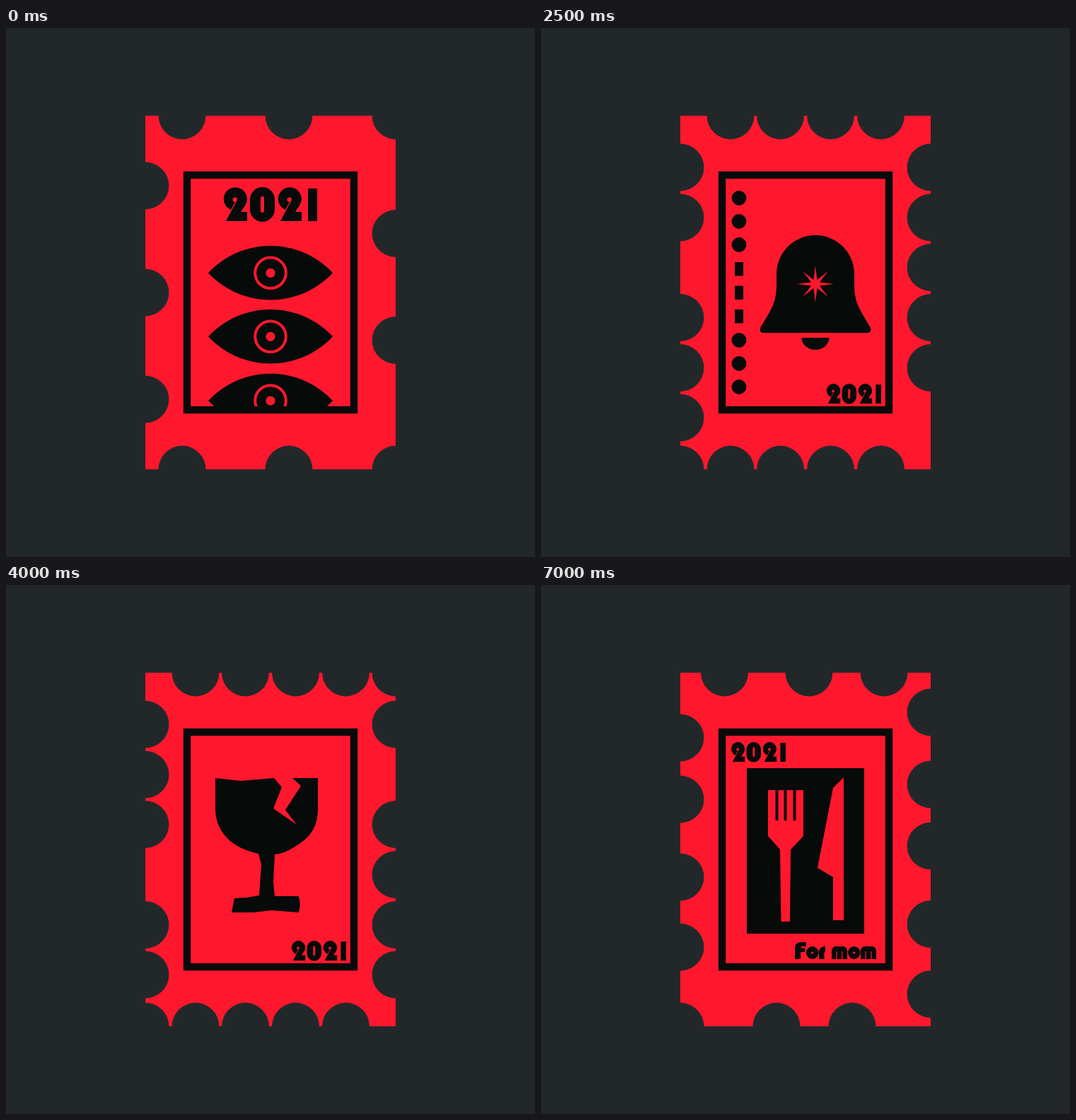
These frames come from a looping animation (748 by 748 pixels, 7.5 s). An HTML page:

```html
<!DOCTYPE html>
<html lang="en">
<head>
<meta charset="utf-8">
<title>Stamps</title>
<style>
html, body { margin: 0; height: 100%; overflow: hidden; background: #222829; }
svg { display: block; width: 100vw; height: 100vh; }
</style>
</head>
<body>
<svg id="stage" viewBox="0 0 748 748" role="img"></svg>
<script>
const RED = '#ff182d', INK = '#060a09', BACK = '#222829';
const stage = document.getElementById('stage');

const path = (d, fill = INK) => `<path d="${d}" fill="${fill}" fill-rule="evenodd"/>`;
const line = (d, width) => `<path d="${d}" fill="none" stroke="${INK}" stroke-width="${width}"/>`;
const disc = (x, y, r, fill = INK) => `<circle cx="${x}" cy="${y}" r="${r}" fill="${fill}"/>`;
const box = (x, y, w, h, fill = INK) => `<rect x="${x}" y="${y}" width="${w}" height="${h}" fill="${fill}"/>`;
const move = (x, y, body, more = '') => `<g transform="translate(${x} ${y}) ${more}">${body}</g>`;

// Display lettering: [advance, outline] on a 48 unit body
const glyphs = {
  2: [39, 'M3 48H33V35H24L30 26A16.5 16.5 0 1 0 10 32L16 21A3.3 3.3 0 1 1 19 18Z'],
  0: [38, 'M-2 17.5a17.5 17.5 0 0 1 35 0v14a17.5 17.5 0 0 1-35 0ZM13 15.5v18a2.5 2.5 0 0 0 5 0v-18a2.5 2.5 0 0 0-5 0Z'],
  1: [19, 'M3 2H16V48H3Z'],
  F: [32, 'M0 48V16A16 16 0 0 1 16 0H32V12H18V17H29V28H16V48Z'],
  o: [36, 'M0 30a17.5 18 0 0 1 35 0a17.5 18 0 0 1-35 0ZM14 30a3.5 3.5 0 0 0 7 0a3.5 3.5 0 0 0-7 0Z'],
  r: [18, 'M0 48V28A16 16 0 0 1 16 12H18V27Q15 27 15 33V48Z'],
  m: [46, 'M0 48V24A12 12 0 0 1 12 12H32A12 12 0 0 1 44 24V48H31V26H28.5V48H15.5V26H13V48Z'],
  ' ': [18, '']
};
function word(text, x, y, scale) {
  let pen = 0;
  return move(x, y, [...text].map(c => {
    const [advance, d] = glyphs[c];
    pen += advance;
    return move(pen - advance, 0, path(d));
  }).join(''), `scale(${scale})`);
}
// Each place: centre x, centre y, angle
const loose = (text, places) => [...text].map((c, i) => {
  const [x, y, turn] = places[i], mid = c === '1' ? 9.5 : 16;
  return move(x, y, path(glyphs[c][1]), `rotate(${turn}) scale(1.18) translate(${-mid} -24.5)`);
}).join('');

const frame = `<rect x="256" y="208" width="236" height="332" fill="none" stroke="${INK}" stroke-width="10.4"/>`;
const year = (x, y) => word('2021', x, y, .583);
const cornerYear = year(404, 503);

function star(x, y, size) {
  const points = Array.from({length: 16}, (_, i) => {
    const r = i % 2 ? 6.5 : i % 4 ? 25 : 26, a = i * Math.PI / 8;
    return `${r * Math.cos(a)},${r * Math.sin(a)}`;
  });
  return move(x, y, `<polygon points="${points.join(' ')}" fill="${RED}"/>`, `scale(${size})`);
}

const eye = y => move(374, y, path('M-88 0C-40-51 40-51 88 0C40 51-40 51-88 0Z') +
  `<circle r="21.8" fill="none" stroke="${RED}" stroke-width="4"/>` + disc(0, 0, 6.6, RED));
const eyes = frame + word('2021', 308, 225, 1) +
  `<g clip-path="url(#window)">${[346.3, 436.3, 527].map(eye).join('')}</g>`;

const letter = line('M323 237L387 241L441 237L437.5 250L443.5 350L445 410L440 442L390 439L323 442L321 365L324 295Z', 6.5) +
  line('M323 237L344 279L380 340L348 383L323 442', 6.5);
const bentLetter = line('M256 194L348 208L404 201L439 208H506L491 320L485 425L492 490V541L457 527L364 547L313 533L256 540L249 474L263 399L249 300Z', 10) +
  letter + loose('2021', [[284, 500, -13], [336, 500, 22], [388, 505, -13], [423.5, 495, -27]]);

const bell = path('M333 348A55 55 0 0 1 443 348V366Q443 385 453 402L466 424Q468 431 461 431H315Q308 431 310 424L323 402Q333 385 333 366Z') +
  path('M368.5 438H407.5A19.5 17 0 0 1 368.5 438Z');
const beads = [240.5, 273.5, 306.5, 441.5, 474.5, 507.5].map(y => disc(280, y, 10.4)).join('') +
  [331, 364.5, 398].map(y => box(274, y, 12, 19.5)).join('');
const plainBell = frame + bell + cornerYear;
const starBell = plainBell + star(388, 362, 1);

const goblet = path('M296 273L332 277L379 273L390 286L378 316L411 339L395 318L417 284L405 273H441V316C441 345 428 358 410 369Q394 380 380 381L378 420L380 440H414L416 452L414 463L375 460L350 463H319L323 443L340 442L358 439L361 395L357 380C320 372 296 350 296 316Z');
const bentGoblet = line('M256 208L332 178L420 193L500 174L476 272L491 378L466 445L485 560L417 591L315 566L238 582L260 460Z', 10.4) +
  goblet + loose('2021', [[284, 536, -13], [352.5, 547.5, 105], [411, 549, -5], [447.5, 536.5, -42]]);

const thirds = [309, 374, 439];
const cross = (x, y, color = INK) =>
  move(x, y, `<path d="M-17-17L17 17M17-17L-17 17" stroke="${color}" stroke-width="18"/>`);
const board = frame + cornerYear + cross(309, 246) + disc(374, 246, 20) + cross(439, 246) +
  thirds.map(x => thirds.map(y => box(x - 28.5, y - 28.5, 57, 57)).join('')).join('');
const game = board + cross(309, 309, RED) + star(309, 374, .74) +
  disc(374, 374, 20, RED) + disc(439, 374, 20, RED) + cross(439, 439, RED);

const rays = Array.from({length: 21}, (_, i) => `M258 ${222 + i * 12.5}L490 ${226 + i * 15.5}`).join('');
const peak = [
  'M357 288Q360 279 370 283L378 291Q378 298 386 307L405 335Q413 345 410 358Q430 370 436 388L440 403L455 425L473 457L459 456Q448 458 442 466Q435 455 424 457Q416 464 395 456L350 454L275 456L279 441Q296 436 289 428Q281 416 305 411Q322 404 302 382Q320 370 320 353Q335 350 344 340L368 303Q372 290 357 292Z',
  'M372 301L383 322L400 345Q402 366 412 372Q428 376 435 402L462 447L430 446Q412 428 398 444Q380 446 360 436Q340 444 322 441L304 436Q308 415 318 408Q320 402 316 399Q324 394 322 380L338 360L352 338Z',
  'M372 314L378 332Q394 338 398 352Q402 375 424 390L438 425Q426 427 420 422Q395 418 380 432Q360 416 330 422L317 409Q334 405 345 384Q348 372 357 340Z',
  'M373 330L385 343Q398 358 402 378L416 396L418 406Q395 402 380 408Q355 400 332 407Q352 386 352 372L360 350Z',
  'M375 341Q392 355 397 380L405 390Q390 392 378 402Q360 392 345 396Q359 380 358 366L364 350Z',
  'M375 350L386 362L392 384Q380 382 374 394Q362 382 352 388Q362 372 362 362Z'
].map((d, i) => path(d, i % 2 ? RED : INK)).join('');
const mountain = line(rays, 2) + peak + frame + year(267, 503);

const cutlery = frame + year(269, 222) + box(291, 259, 166, 234) +
  path('M321 290H371V355L353 374L352 476H339.5L338 374L321 355Z', RED) +
  [331.5, 343.5, 356.5].map(x => box(x, 289, 4, 44)).join('') +
  path('M428 272V474H413V413L391 400L413 287Z', RED) + word('For mom', 359, 505, .5);

const grid = [197, 268, 338.5, 409.5, 480.5, 551];
const at = picks => [...picks].map(i => grid[i]);

// Notches: top, right, bottom, left, then the height of the top row
const wide = [[249, 400, 551], [290.5, 441.5], [249, 400, 551], [223, 374, 525]];
const meal = [[259.5, 379, 485], [180, 282, 369, 479.5, 578.5], [197, 333, 440], [216, 303, 413, 512]];
const even = (...sides) => sides.map(at);

const scenes = [
  [eyes, wide],
  [frame + letter + cornerYear, even('1234', '01345', '01345', '01234')],
  [bentLetter, [[315.5, 426.5, 551], [319, 430, 527], [266, 349, 425.5, 509.5], [173.5, 250, 381.5, 520], 125]],
  [plainBell, even('1234', '0245', '1234', '0135')],
  [starBell, even('1234', '0135', '1234', '0135')],
  [starBell + beads, even('1234', '01234', '01234', '01345')],
  [frame + goblet + cornerYear, even('01345', '01245', '0125', '01234')],
  [bentGoblet, [[198, 295.5, 364, 447, 551], [216, 340, 458, 597], [198, 309.5, 468.5], [230, 327, 396, 514], 132]],
  [frame + goblet + cornerYear, even('12345', '02345', '01234', '01245')],
  [board, even('01234', '01234', '12345', '01235')],
  [game, even('012345', '012345', '01345', '01234')],
  [game + cross(374, 309, RED), even('01245', '01345', '01245', '12345')],
  [mountain, even('01345', '1235', '01345', '012345')],
  [mountain, even('12345', '01235', '01234', '01345')],
  [cutlery, meal]
];

function stamp([art, [top, right, bottom, left, y = 124]]) {
  const holes = [
    ...top.map(x => [x, y]), ...right.map(v => [551, v]),
    ...bottom.map(x => [x, 624]), ...left.map(v => [197, v])
  ];
  return `<defs><clipPath id="sheet">${box(197, 124, 354, 500)}</clipPath>
    <clipPath id="window">${box(256, 208, 236, 327)}</clipPath></defs>
    <g clip-path="url(#sheet)">${box(197, 124, 354, 500, RED)}
    ${holes.map(([x, v]) => disc(x, v, 33.4, BACK)).join('')}${art}</g>`;
}

let shown = -1;
function draw() {
  const slot = Math.floor(performance.now() % 7500 / 500);
  if (slot !== shown) {
    shown = slot;
    stage.innerHTML = stamp(scenes[slot]);
    stage.setAttribute('aria-label', slot === 14 ? '2021, For mom' : '2021');
  }
  requestAnimationFrame(draw);
}
draw();
</script>
</body>
</html>
```
